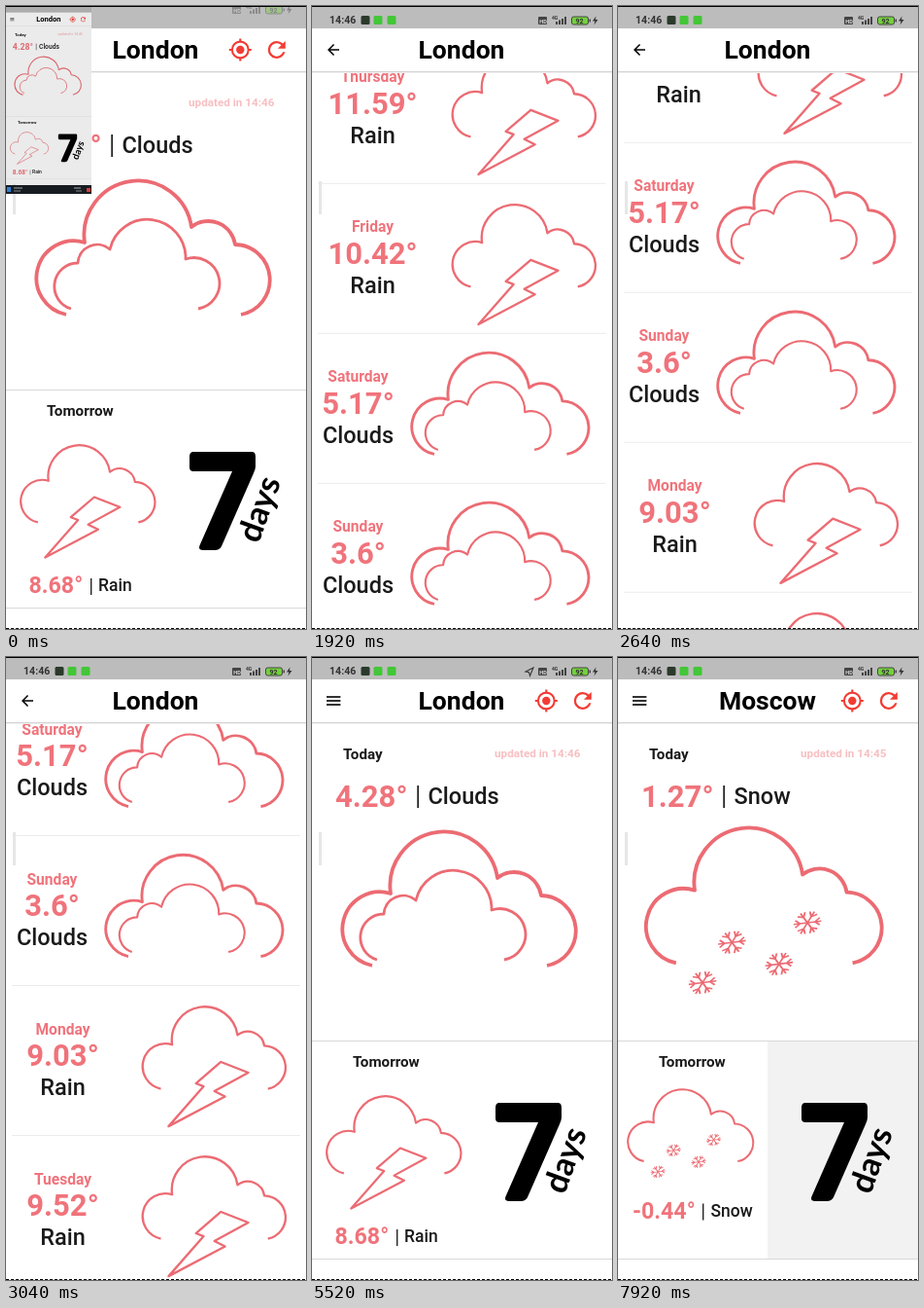
Recreate the animation shown at these times as an HTML page. Size 309x640 px, loop 8000 ms.

```html
<!DOCTYPE html>
<html lang="en">
<head>
<meta charset="utf-8">
<title>Weather app</title>
<style>
html, body { margin: 0; width: 100%; height: 100%; overflow: hidden; background: #fff; }
svg { display: block; width: 309px; height: 640px; font-family: Roboto, sans-serif; }
.bold { font-weight: 700; }
.sky { font-weight: 500; }
.pink { fill: #f0737b; }
.mid { text-anchor: middle; }
.line { fill: none; stroke: #ec6b73; stroke-linejoin: round; }
</style>
</head>
<body>
<svg id="stage" viewBox="0 0 309 640">
  <defs>
    <path id="cloud" d="M31 138A38.25 38.25 0 1 1 50 64A55 55 0 0 1 160 48A28 28 0 0 1 205 66A36.3 36.3 0 0 1 211 138"/>
    <path id="inner" d="M36 132A24 24 0 0 1 43 85A20 20 0 0 1 76 71A39.5 39.5 0 0 1 154 81A26.4 26.4 0 1 1 167 132"/>
    <path id="bolt" d="M132 93L178 111L121 142L139 151L44 201L103 134L90 129Z"/>
    <path id="arm" d="M0 0V-13M-4 -11.500L0 -7L4 -11.500"/>
  </defs>
</svg>
<script>
const LOOP = 8000, STEP = 80;
const stage = document.getElementById('stage');

const text = (x, y, size, str, cls = '', fill = '') =>
  `<text x="${x}" y="${y}" font-size="${size}" class="${cls}"${fill && ` fill="${fill}"`}>${str}</text>`;
const rect = (x, y, w, h, fill, extra = '') =>
  `<rect x="${x}" y="${y}" width="${w}" height="${h}" fill="${fill}" ${extra}/>`;
const group = (transform, body, extra = '') => `<g transform="${transform}" ${extra}>${body}</g>`;
const ref = id => `<use href="#${id}"/>`;

// Weather icons, drawn in a 240-unit-wide box
const flake = (x, y) => group(`translate(${x} ${y}) rotate(20) skewX(-12)`,
  [0, 60, 120, 180, 240, 300].map(a => group(`rotate(${a})`, ref('arm'))).join(''), 'stroke-width="1.7"');
const art = {
  Clouds: ref('cloud') + group('', ref('inner'), 'stroke-width="2.8"'),
  Rain: ref('cloud') + ref('bolt'),
  Snow: ref('cloud') + flake(88, 117) + flake(165, 97) + flake(136, 139) + flake(58, 158)
};
const icon = (kind, x, y, scale) =>
  group(`translate(${x} ${y}) scale(${scale})`, art[kind], 'class="line" stroke-width="3.8"');

const header = city =>
  rect(0, 20, 309, 47, '#fff') + rect(0, 67, 309, 1, '#d3d3d3') + rect(0, 68, 309, 1, '#f0f0f0') +
  text(154, 54, 26.5, city, 'bold mid');

const menu = [41, 45, 49].map(y => rect(15, y - 0.8, 14.4, 1.6, '#000')).join('');
const locate = `<g fill="none" stroke="#f23c34" stroke-width="2.1">
  <circle cx="241.3" cy="45" r="8.4"/><path d="M241.3 33.5v3M241.3 53.5v3M229.8 45h3M249.8 45h3"/>
  <circle cx="241.3" cy="45" r="4.2" fill="#f23c34" stroke="none"/></g>`;
const refresh = `<path transform="translate(265.4 31.5) scale(1.12)" fill="#f23c34" d="M17.65 6.35A7.96 7.96 0 0 0 12 4a8 8 0 1 0 7.73 10h-2.08A6 6 0 1 1 12 6c1.66 0 3.14.69 4.22 1.78L13 11h7V4z"/>`;
const week = `<path d="M193 458H253Q257 458 257 463V473Q257 476 255 480L222 555Q220 559 215 559H203Q197 559 200 553L233 478H193Q189 478 189 474V463Q189 458 193 458Z"/>
  <text transform="translate(260 553) rotate(-70)" font-size="34" font-weight="700" font-family="Lato, sans-serif">days</text>`;

function home(city, updated, today, tomorrow) {
  const [t1, c1, x1, y1, s1] = today, [t2, c2, x2, y2, s2, tx, cx, base] = tomorrow;
  return rect(0, 0, 309, 640, '#fff') + header(city) + menu + locate + refresh +
    text(32, 105, 15.2, 'Today', 'bold', '#1a1a1a') +
    text(188, 103, 11.7, 'updated in ' + updated, 'bold', '#f9bec1') +
    text(24, 153.5, 31, t1, 'bold pink') +
    rect(108.3, 132, 1.8, 23, '#222') + text(119.5, 151, 23.5, c1, 'sky', '#1a1a1a') +
    icon(c1, x1, y1, s1) +
    rect(0, 394, 309, 1, '#d9d9d9') + rect(0, 618, 309, 1, '#d9d9d9') +
    text(42, 421, 15.2, 'Tomorrow', 'bold', '#1a1a1a') +
    icon(c2, x2, y2, s2) +
    text(tx, base, 23.2, t2, 'bold pink') +
    rect(87, base - 15, 1.4, 17, '#222') + text(cx, base - 2, 17.5, c2, 'sky', '#1a1a1a');
}

const days = [
  ['Wednesday', '8.68°', 'Rain', 59], ['Thursday', '11.59°', 'Rain', 62], ['Friday', '10.42°', 'Rain', 62],
  ['Saturday', '5.17°', 'Clouds', 47], ['Sunday', '3.6°', 'Clouds', 47],
  ['Monday', '9.03°', 'Rain', 58], ['Tuesday', '9.52°', 'Rain', 58]
];
const dayRow = ([name, temp, sky, cx], i) => {
  const y = 112 + i * 154;
  return text(cx + 0.5, y + 5.5, 15.6, name, 'bold pink mid') +
    text(cx + 0.5, y + 38, 31, temp, 'bold pink mid') +
    text(cx + 0.5, y + 68, 23.5, sky, 'sky mid', '#1a1a1a') +
    (sky === 'Rain' ? icon(sky, cx + 82.5, y - 23, 0.6125) : icon(sky, cx + 55.5, y - 25, 0.758));
};
const rules = days.map((d, i) => rect(6, 221 + i * 154, 297, 1, '#ececec')).join('');

const list = rect(0, 0, 309, 640, '#fff') +
  `<g id="rows"><g id="rules">${rules}</g>${days.map(dayRow).join('')}</g>` + header('London') +
  '<circle id="press" cx="22" cy="44" r="27" fill-opacity=".1"/>' +
  '<path transform="translate(13 36) scale(.75)" d="M20 11H7.83l5.59-5.59L12 4l-8 8 8 8 1.41-1.41L7.83 13H20z"/>';

const square = (x, fill) => rect(x, 10, 9, 9, fill, 'rx="1.5"');
const status = rect(0, 0, 309, 23, '#bcbcbc') + `<g id="icons">` +
  text(18, 18.3, 10.6, '14:46', 'bold', '#333') +
  square(50.5, '#2b3a2b') + square(63.5, '#43c637') + square(77.5, '#43c637') +
  '<path id="gps" d="M228 11L220 15L223.500 15.700L224.500 19.300Z" fill="none" stroke="#333" stroke-width="1.1"/>' +
  rect(233, 11, 9, 8, '#444', 'rx="1"') + text(234.3, 17.6, 5.5, 'HD', 'bold', '#ddd') +
  text(247, 14, 5, '4G', 'bold', '#333') +
  [3, 4.5, 6, 8].map((h, i) => rect(251 + i * 3, 19 - h, 2, h, '#444')).join('') +
  rect(267.5, 11, 17, 8, '#73d13c', 'rx="2" stroke="#444"') + rect(285.5, 13.5, 1.5, 3, '#444') +
  text(271.5, 17.6, 7, '92', 'bold', '#333') +
  '<path d="M292.500 10.500L289 15.500H291.500L290.500 19.500L294.500 14H292Z" fill="#333"/></g>';

const thumb = group('translate(0 1) scale(.2848)', ref('london') + week + rect(0, 0, 309, 20, '#bbb')) +
  rect(0, 0, 88, 184, '#000', 'fill-opacity=".08"') + rect(0, 184, 88, 9, '#171c22') +
  rect(1, 186, 4, 5, '#2f7fd0') + rect(8, 186.5, 9, 1, '#aaa') + rect(8, 189.5, 7, 1, '#888') +
  rect(70, 186.5, 7, 1, '#aaa') + rect(72, 189.5, 6, 1, '#888') + rect(83, 187, 4, 4, '#d23b3b');

stage.insertAdjacentHTML('beforeend',
  `<g id="london">${home('London', '14:46', ['4.28°', 'Clouds', 31, 179, 1],
    ['8.68°', 'Rain', 15, 451, 0.575, 23.5, 95, 603])}</g>` +
  `<g id="moscow">${home('Moscow', '14:45', ['1.27°', 'Snow', 28.5, 175, 1.01],
    ['-0.44°', 'Snow', 10, 444, 0.537, 15, 95.5, 576.5])}</g>` +
  rect(154, 395, 155, 223, '#000', 'id="tap"') + week +
  `<g id="list">${list}</g>` + status +
  rect(7, 180, 3, 34, '#e6e6e6') +
  `<g id="thumb">${thumb}</g>` +
  rect(0, 0, 309, 1, '#000') +
  '<path d="M0 639.500H309" stroke="#000" stroke-dasharray="3 2"/>');

const el = Object.fromEntries(['london', 'moscow', 'tap', 'list', 'rows', 'rules', 'press', 'icons', 'gps', 'thumb']
  .map(id => [id, document.getElementById(id)]));
const show = (node, on) => node.style.display = on ? '' : 'none';
const move = (node, x, y) => node.setAttribute('transform', `translate(${x} ${y})`);
const fade = (node, a) => node.setAttribute('opacity', a);

const span = (t, a, b) => Math.min(1, Math.max(0, (t - a) / (b - a)));
const easeOut = (u, k) => 1 - (1 - u) ** k;
const scrollAt = t => 366 * easeOut(span(t, 1720, 2600), 2.91) + 134 * easeOut(span(t, 2600, 3040), 2);

function draw(t) {
  // Screenshot preview leaves, status icons drop back in
  const away = span(t, 0, 320);
  show(el.thumb, t < 320);
  move(el.thumb, -88 * away, 0);
  move(el.icons, 0, -11 * (1 - away));
  fade(el.icons, 0.4 + 0.6 * away);

  // Seven-day list opens at once, scrolls, then sinks and fades
  const y = scrollAt(t), leave = t < 4240 ? 0 : t < 4320 ? 0.08 : 0.36;
  show(el.list, t >= 1280 && t < 4400);
  move(el.rows, 0, -y);
  show(el.rules, y > 0);
  move(el.list, 0, 50 * leave);
  fade(el.list, 1 - 1.58 * leave);
  show(el.press, t >= 4240);

  show(el.gps, t >= 4960 && t < 6240);
  show(el.london, t < 6800);
  show(el.moscow, t >= 6800);
  fade(el.tap, 0.05 * span(t, 7520, 7920));
}

const start = performance.now();
function tick() {
  const t = (performance.now() - start) % LOOP;
  draw(Math.floor(t / STEP) * STEP);
  requestAnimationFrame(tick);
}
tick();
</script>
</body>
</html>
```
